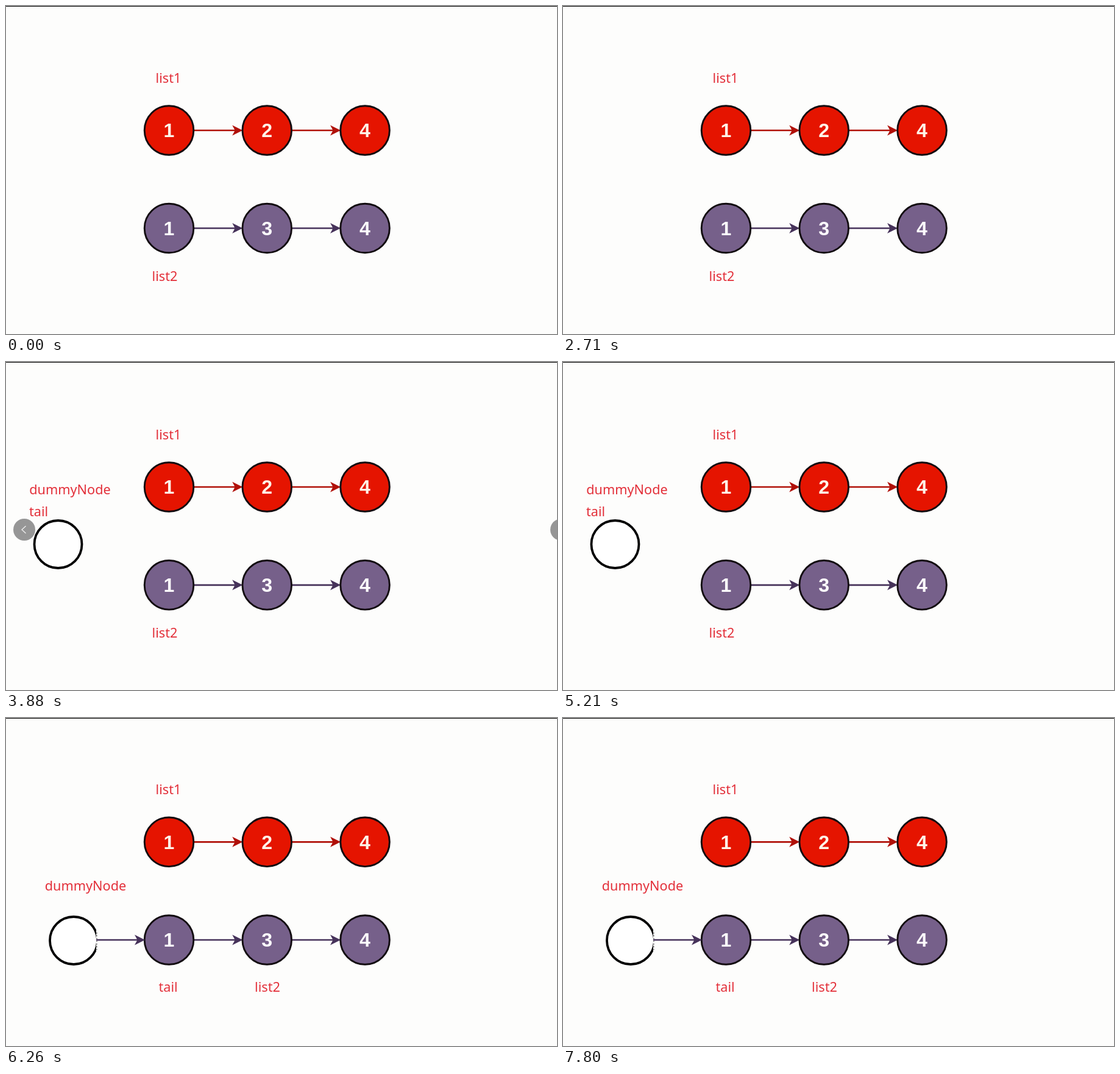
An HTML page for the animation above (8000 ms loop, 904 px wide and 538 px high).

```html
<!DOCTYPE html>
<html lang="en">
<head>
<meta charset="utf-8">
<title>Merging two linked lists</title>
<style>
  html, body { margin: 0; width: 100%; height: 100%; overflow: hidden; background: #fdfdfc; }
  svg { display: block; width: 100vw; height: 100vh; }
  .label { font: 21.7px "Noto Sans", "Open Sans", sans-serif; fill: #e3303a; text-anchor: middle; }
  .digit { font: bold 32px "Liberation Sans", Arial, sans-serif; text-anchor: middle; }
</style>
</head>
<body>
<svg viewBox="0 0 904 538">
  <defs><clipPath id="cut"><rect x="60" y="310" width="88" height="110"/></clipPath></defs>
  <rect width="904" height="538" fill="#fdfdfc"/>
  <rect width="904" height="1" fill="#000"/>
  <g id="scene"></g>
  <g id="buttons">
    <circle cx="30" cy="275" r="18" fill="#969696"/>
    <path d="M32.5 269 L26 275 L32.5 281" fill="none" stroke="#ededed" stroke-width="1.4"/>
    <circle cx="911" cy="275" r="18" fill="#969696"/>
  </g>
</svg>
<script>
const LOOP = 8000;
const COLUMNS = [267.5, 428.2, 589];
const RED = { fill: "#e51400", ink: "#fff4e8", line: "#b01008" };
const PURPLE = { fill: "#76608a", ink: "#fdfbfd", line: "#46325a" };

const label = (text, x, y) => `<text class="label" x="${x}" y="${y}">${text}</text>`;

const node = (x, y, value, { fill, ink }) =>
  `<circle cx="${x}" cy="${y}" r="40.3" fill="${fill}" stroke="#120c10" stroke-width="2.9"/>
   <text class="digit" x="${x}" y="${y + 11.3}" fill="${ink}">${value}</text>`;

const arrow = (from, tip, y, { line }) =>
  `<path d="M${from} ${y}H${tip - 11}" stroke="${line}" stroke-width="2.7"/>
   <path d="M${tip} ${y}l-17 -8.5l4.5 8.5l-4.5 8.5z" fill="${line}"/>`;

const chain = (values, y, style) =>
  COLUMNS.slice(1).map((x, i) => arrow(COLUMNS[i] + 41, x - 40, y, style)).join("") +
  values.map((value, i) => node(COLUMNS[i], y, value, style)).join("");

const lists = (redY, purpleY) =>
  chain([1, 2, 4], redY, RED) + chain([1, 3, 4], purpleY, PURPLE);

const emptyNode = (x, y, extra = "") =>
  `<circle cx="${x}" cy="${y}" r="39" fill="#fff" stroke="#000" stroke-width="3.8" ${extra}/>`;

const scenes = [
  { start: 0, buttonsUntil: 0, markup:
      lists(204, 364.5) +
      label("list1", 266.5, 126) + label("list2", 260.5, 451) },
  { start: 3640, buttonsUntil: 3920, markup:
      lists(205, 365.8) +
      label("list1", 266.5, 127) + label("list2", 260.5, 452) +
      label("dummyNode", 105, 216.5) + label("tail", 53.5, 252.5) +
      emptyNode(85.5, 299) },
  { start: 5940, buttonsUntil: 6260, markup:
      lists(203.3, 364) +
      label("list1", 266.5, 125) + label("list2", 429, 449) +
      label("dummyNode", 130.5, 283) + label("tail", 266, 449) +
      emptyNode(111, 365, 'clip-path="url(#cut)"') +
      `<path d="M149 352V380" stroke="#555" stroke-width="1.5" stroke-dasharray="1.5 3"/>` +
      arrow(148, 228, 364, PURPLE) }
];

const sceneGroup = document.getElementById("scene");
const buttons = document.getElementById("buttons");
let shown;

function render(time) {
  const scene = scenes.findLast(s => time >= s.start);
  if (scene !== shown) {
    sceneGroup.innerHTML = scene.markup;
    shown = scene;
  }
  buttons.setAttribute("visibility", time < scene.buttonsUntil ? "visible" : "hidden");
}

const origin = performance.now();
function tick() {
  render((performance.now() - origin) % LOOP);
  requestAnimationFrame(tick);
}
tick();
</script>
</body>
</html>
```
